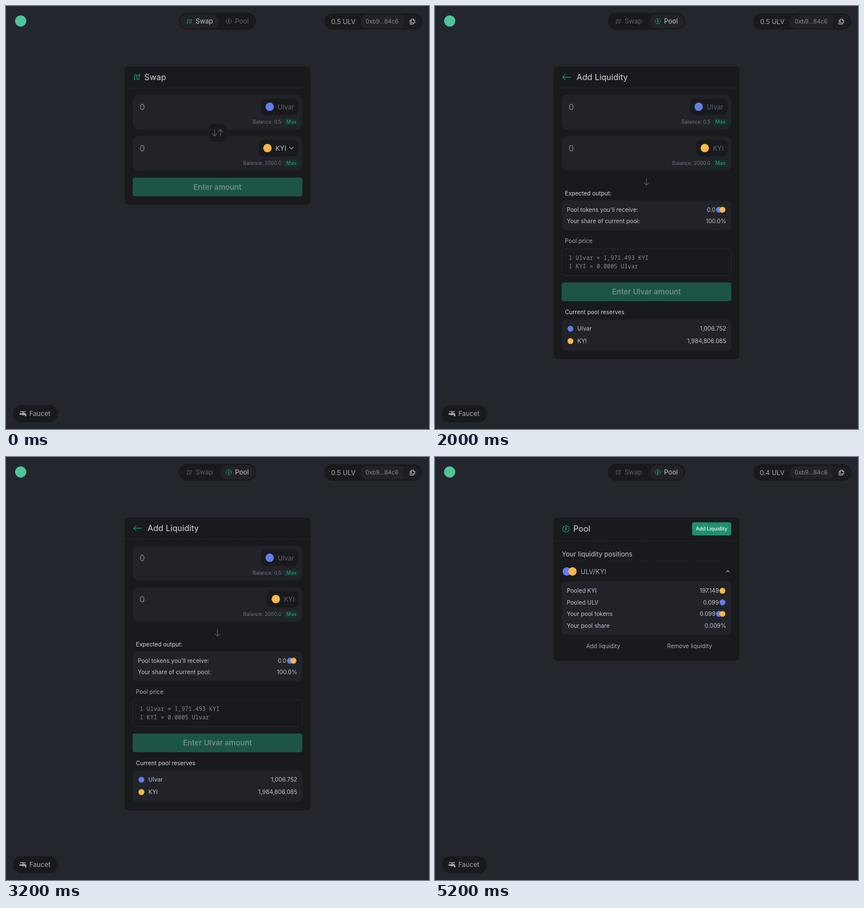
Write an HTML page that moves like this. It is 748 px wide and 748 px high and loops after 6 s.

```html
<!DOCTYPE html>
<html lang="en">
<head>
<meta charset="utf-8">
<title>Token swap</title>
<style>
  html, body { margin: 0; width: 100%; height: 100%; overflow: hidden; background: #24262d; }
  svg { display: block; width: 748px; height: 748px; }
  text { font-family: Inter, sans-serif; white-space: pre; }
  .mono { font-family: "Noto Sans Mono", monospace; }
  .scene { opacity: 0; }
</style>
</head>
<body>
<svg id="stage" viewBox="0 0 748 748" xmlns="http://www.w3.org/2000/svg"></svg>
<script>
const LOOP = 6000;
const C = {
  card: '#191a1d', panel: '#212329', line: '#2d3035', green: '#1f9a78',
  bright: '#d3d6da', text: '#c0c4ca', mid: '#a4a8af', soft: '#858a92',
  dim: '#5d6269', blue: '#627eea', gold: '#f5b94a'
};
// Type scale: xs, sm, base, lg, xl
const XS = 8.77, SM = 10.23, MD = 11.69, LG = 13.15, XL = 14.61;
const COIN = 'Ulvar', SYM = 'ULV', USD = 'KYI';

const text = (x, y, s, size, fill, { anchor = 'start', weight = 400, cls = '' } = {}) =>
  `<text x="${x}" y="${y}" font-size="${size}" fill="${fill}" text-anchor="${anchor}" font-weight="${weight}" class="${cls}">${s}</text>`;
const right = (x, y, s, size, fill) => text(x, y, s, size, fill, { anchor: 'end' });
const center = (x, y, s, size, fill, weight) => text(x, y, s, size, fill, { anchor: 'middle', weight });
const box = (x, y, w, h, r, fill, extra = '') =>
  `<rect x="${x}" y="${y}" width="${w}" height="${h}" rx="${r}" fill="${fill}" ${extra}/>`;
const dot = (x, y, r, fill) => `<circle cx="${x}" cy="${y}" r="${r}" fill="${fill}"/>`;
const stroke = (d, color, w = 1, extra = '') =>
  `<path d="${d}" fill="none" stroke="${color}" stroke-width="${w}" stroke-linecap="round" stroke-linejoin="round" ${extra}/>`;
const at = (x, y, k, s) => `<g transform="translate(${x} ${y}) scale(${k})">${s}</g>`;
const dashes = (x1, x2, y) =>
  `<path d="M${x1} ${y}H${x2}" stroke="${C.line}" stroke-width=".8" stroke-dasharray="2.2 1.5"/>`;

// Icons
const swapIcon = (x, y, k, color) => at(x, y, k,
  stroke('M-4 4.5V-2.5A2 2 0 0 1 0 -2.5V2.5A2 2 0 0 0 4 2.5V-4.5M2.3 -3L4 -4.7L5.7 -3M-5.3 4.5H-2.7', color, 1.2));
const coinIcon = (x, y, k, color) => at(x, y, k,
  `<circle r="5.6" fill="none" stroke="${color}" stroke-width="1.1"/>` +
  stroke('M1.7 -1.5C1.2 -2.4 -1.7 -2.4 -1.7 -1.1C-1.7 .3 1.8 -.3 1.8 1.2C1.8 2.5 -1.3 2.5 -1.8 1.5M0 -3.2V3.2', color, 1));
const copyIcon = (x, y) => at(x, y, 1,
  stroke('M-1.8 -4.5H1.8L4.2 -2.1V2.2H-1.8ZM1.6 -4.5V-1.9H4.2M-1.8 -2.3H-4.2V4.5H1.8V2.2', C.text, 1));
const faucetIcon = (x, y) => at(x, y, 1,
  `<path d="M-5 -4.7L-.8 -4.3V-5H.8V-4.3L5 -4.7V-2.9L.8 -3.3V-1.7H2C4.6 -1.7 6 0 6 2.1V4.2H3.3V2.6C3.3 2 2.9 1.7 2.4 1.7H1.9C1.2 2.9 -1.2 2.9 -1.9 1.7H-6V-1H-2L-.8 -1.7V-3.3L-5 -2.9Z" fill="${C.mid}"/>`);
const chevron = (x, y, dir, w = 3.2) =>
  stroke(`M${x - w} ${y - dir * w / 2}L${x} ${y + dir * w / 2}L${x + w} ${y - dir * w / 2}`, C.mid, 1.2);
const vArrow = (x, y, dir, h) =>
  stroke(`M${x} ${y - dir * h}V${y + dir * h}M${x - 4} ${y + dir * (h - 4)}L${x} ${y + dir * h}L${x + 4} ${y + dir * (h - 4)}`, C.dim, 1.1);
const pair = y => dot(502.2, y, 5.2, C.blue) + dot(508.3, y, 5.2, C.gold);

// Parts
const card = (h, lineY) => box(209.5, 106.8, 329, h, 7.3, C.card) + dashes(209.5, 538.5, lineY);
const panel = (y, h, r = 7.3) => box(224, y, 300, h, r, C.panel);
const button = (y, label) =>
  box(224, y, 300, 33.2, 4, '#1c5546') + center(374, y + 21.4, label, LG, '#6f8d85', 600);

function amount(y, name, color, left, balance, open) {
  return panel(y, 61.5, 11) +
    text(236.2, y + 27, '0', XL, '#858a91') +
    box(left, y + 6.5, 517.5 - left, 29.4, 9, C.card) +
    dot(left + 15.3, y + 21.2, 7.4, color) +
    text(left + 29.6, y + 25.5, name, MD, open ? C.text : C.dim) +
    (open ? chevron(504.8, y + 21.2, 1) : '') +
    right(487, y + 51, `Balance: ${balance}`, XS, '#70757d') +
    box(492, y + 41.8, 25.5, 12.8, 3.6, '#19302b') +
    center(504.8, y + 51, 'Max', XS, '#25936f', 500);
}

const row = (y, label, value, end = 515, x = 233) =>
  text(x, y, label, SM, C.text) + right(end, y, value, SM, C.text);

function header(onSwap, balance) {
  const hue = on => on ? C.green : C.dim;
  const ink = on => on ? C.text : C.dim;
  return (onSwap ? box(308.3, 14.6, 68, 25, 12.5, C.panel) : box(379, 14.6, 60.8, 25, 12.5, C.panel)) +
    swapIcon(324, 27, .8, hue(onSwap)) + text(335.2, 31.2, 'Swap', MD, ink(onSwap)) +
    coinIcon(394, 27, .82, hue(!onSwap)) + text(405, 31.2, 'Pool', MD, ink(!onSwap)) +
    right(618, 31.6, `${balance} ${SYM}`, MD, C.mid);
}

const frame =
  box(0, 0, 748, 748, 0, '#24262d') +
  dot(26, 26.5, 10, '#4fc59c') +
  box(305.6, 11.8, 136.6, 30.4, 15.2, C.card) +
  box(562.8, 13, 173.4, 29, 14.5, C.card) +
  `<path d="M703.5 15.8H639A11.8 11.8 0 0 0 639 39.6H703.5Z" fill="${C.panel}"/>` +
  `<path d="M704.6 15.8H721.8A11.8 11.8 0 0 1 721.8 39.6H704.6Z" fill="#1c1e22"/>` +
  text(636, 31.4, '0xb9...84c6', SM, C.soft) +
  copyIcon(718.7, 27.7) +
  box(11.7, 705.8, 80.2, 30.4, 15.2, C.card) +
  faucetIcon(30, 721.2) +
  text(41.2, 725.2, 'Faucet', MD, C.mid);

const swapScene =
  header(true, '0.5') + card(244.4, 145) +
  swapIcon(231.4, 125.6, 1, C.green) + text(244.6, 131, 'Swap', XL, C.bright) +
  amount(157, COIN, C.blue, 451, '0.5') +
  amount(230, USD, C.gold, 447, '2000.0', true) +
  box(357.6, 207.7, 33, 33, 9.5, C.card, `stroke="${C.panel}" stroke-width="1.2"`) +
  vArrow(368.8, 224.3, 1, 5.8) + vArrow(379.2, 224.3, -1, 5.8) +
  button(303.4, 'Enter amount');

const addScene =
  header(false, '0.5') + card(517.9, 145) +
  stroke('M240.3 125.8H225.8M230.3 121.3L225.8 125.8L230.3 130.3', C.green, 1.2) +
  text(250.3, 131, 'Add Liquidity', XL, C.bright) +
  amount(157, COIN, C.blue, 451, '0.5') +
  amount(230, USD, C.gold, 461.8, '2000.0') +
  vArrow(374, 311, 1, 5.8) +
  text(229.8, 334.6, 'Expected output:', SM, C.bright) +
  panel(344, 52.6) +
  row(364, "Pool tokens you'll receive:", '0.0', 496) + pair(360.2) +
  row(384.4, 'Your share of current pool:', '100.0%') +
  text(229.8, 419.4, 'Pool price', SM, C.mid) +
  box(224.4, 429.4, 299.2, 47.4, 5, 'none', 'stroke="#383b41" stroke-width=".8" stroke-dasharray="2.2 1.5"') +
  text(236.6, 449.3, `1 ${COIN} = 1,971.493 ${USD}`, SM, C.soft, { cls: 'mono' }) +
  text(236.6, 464, `1 ${USD} = 0.0005 ${COIN}`, SM, C.soft, { cls: 'mono' }) +
  button(488.9, `Enter ${COIN} amount`) +
  text(229.8, 545.2, 'Current pool reserves', SM, C.bright) +
  panel(554.5, 55) +
  dot(239.5, 570.6, 5.2, C.blue) + row(574.4, COIN, '1,006.752', 515, 251.8) +
  dot(239.5, 592.5, 5.2, C.gold) + row(596.3, USD, '1,984,806.085', 515, 251.8);

const poolScene =
  header(false, '0.4') + card(253.6, 148) +
  coinIcon(231.5, 127.2, 1, C.green) + text(244.4, 132.4, 'Pool', XL, C.bright) +
  box(454.6, 115.4, 69.2, 23.4, 3.8, '#1f9070') +
  center(489.2, 130.2, 'Add Liquidity', XS, '#dcebe6', 600) +
  text(224.2, 176, 'Your liquidity positions', MD, C.text) +
  dashes(224, 524, 184.4) +
  dot(233, 202.3, 7.4, C.blue) + dot(243.2, 202.3, 7.4, C.gold) +
  text(257.6, 206.6, `${SYM}/${USD}`, MD, C.mid) +
  chevron(517.8, 202.1, -1, 2.7) +
  panel(220.2, 93.6) +
  row(240.2, `Pooled ${USD}`, '197.149', 502) + dot(508.3, 236.5, 5.2, C.gold) +
  row(260.7, `Pooled ${SYM}`, '0.099', 502) + dot(508.3, 257, 5.2, C.blue) +
  row(281.2, 'Your pool tokens', '0.099', 496) + pair(277.4) +
  row(301.6, 'Your pool share', '0.009%') +
  center(297.4, 338.1, 'Add liquidity', SM, C.mid) +
  center(450.2, 338.1, 'Remove liquidity', SM, C.mid);

const scenes = [swapScene, addScene, poolScene];
const stage = document.getElementById('stage');
stage.innerHTML = frame + scenes.map(s => `<g class="scene">${s}</g>`).join('');

// Each scene holds for an equal share of the loop, with hard cuts.
stage.querySelectorAll('.scene').forEach((el, i) => {
  const steps = [0, 1, 2, 3].map(k => ({
    offset: k / 3, opacity: k % 3 === i ? 1 : 0, easing: 'steps(1, end)'
  }));
  el.animate(steps, { duration: LOOP, iterations: Infinity });
});
</script>
</body>
</html>
```
